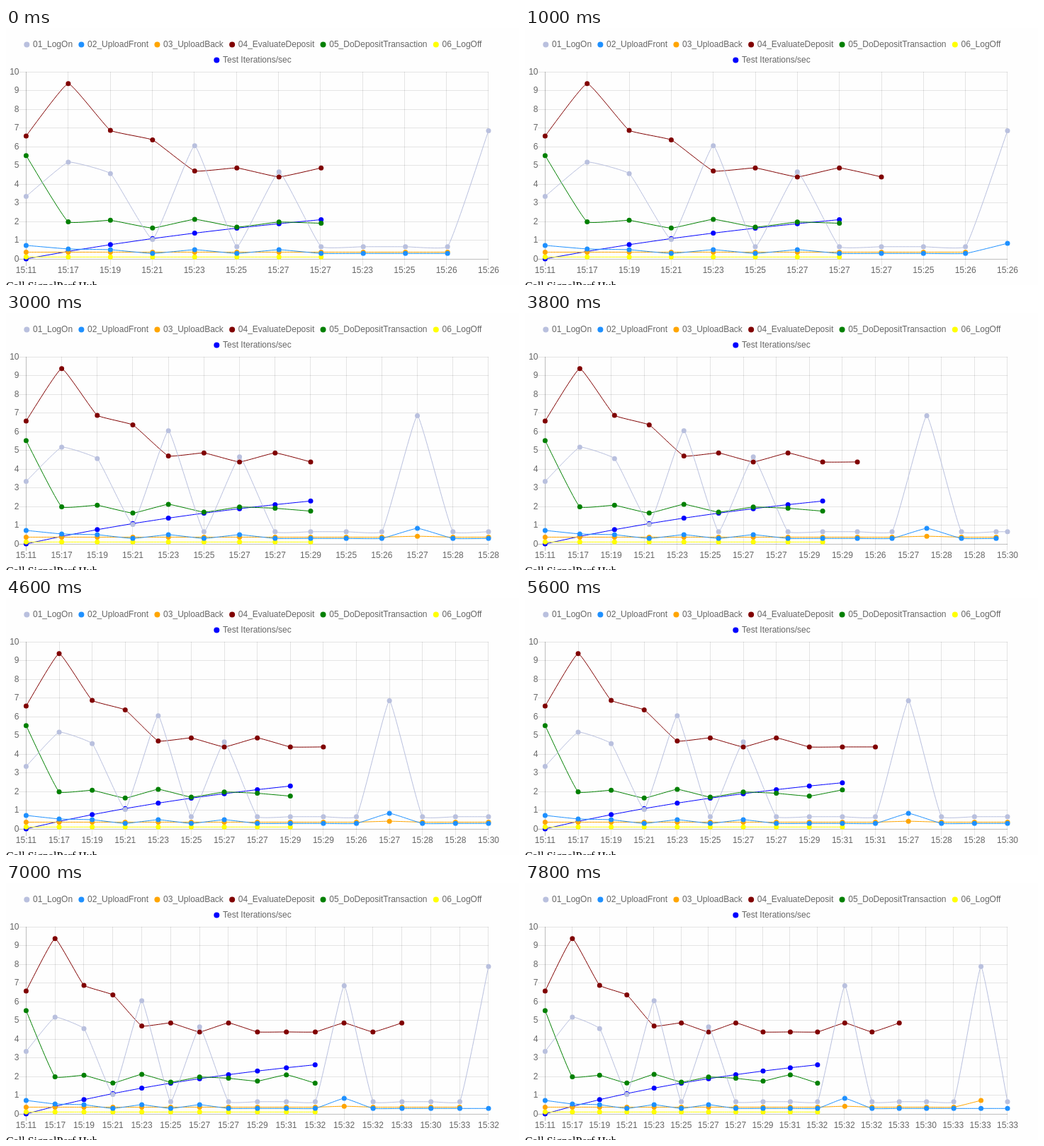
Recreate the animation shown at these times as an HTML page with a canvas. Size 724 px wide and 364 px high, loop 8000 ms.

```html
<!DOCTYPE html>
<html lang="en">
<head>
<meta charset="utf-8">
<title>Transaction timings</title>
<style>
  html, body { margin: 0; width: 100%; height: 100%; overflow: hidden; background: #fefefe; }
  canvas { display: block; }
</style>
</head>
<body>
<canvas id="stage" width="724" height="364"></canvas>
<script>
const ctx = document.getElementById('stage').getContext('2d');
const LOOP = 8000, STEP = 200, EASE_MS = 1000;
const LEFT = 28.4, RIGHT = 680.98, TOP = 62, BOTTOM = 327;
const TENSION = .1;
const FONT = '12px "Liberation Sans", Arial, sans-serif';

// Logons arrive first; both uploads follow each one after a fixed lag
const logons = [-600, 1446, 1470, 3700, 5900, 6290, 7200];
const follow = (lag, earliest) => logons.map(t => Math.max(earliest, t + lag));
const finished = [0, 1, 2].map(n => 2800 + 1900 * n);

// Key values by position, with a rule for all the others
const keyed = (keys, rule) => i => keys[i] ?? rule(i);
const beat = i => (i % 2 ? -1 : 1) * Math.cos((i - 3.5) * Math.PI / 6.6);

// "shown" values were there long before; the others come at "times"
const series = [
  { name: '01_LogOn', color: '#b9c0de', shown: 11, times: logons,
    value: keyed({ 0: 3.34, 1: 5.17, 2: 4.56, 3: 1.04, 4: 6.05, 6: 4.65, 11: 6.85, 16: 7.88 }, () => .65) },
  { name: '02_UploadFront', color: '#1e90ff', shown: 11, times: follow(320, 400),
    value: keyed({ 0: .72, 1: .53, 11: .83 }, i => i < 8 && i % 2 === 0 ? .49 : .29) },
  { name: '03_UploadBack', color: '#ffa500', shown: 11, times: follow(900, 1480),
    value: keyed({ 11: .41, 16: .72 }, () => .36) },
  { name: '04_EvaluateDeposit', color: '#800000', shown: 8, times: [1000, 3400, 5400, 6400, 6600, 6800],
    value: keyed([6.57, 9.37, 6.87, 6.36, 4.7], i => i % 2 && i % 3 ? 4.86 : 4.38) },
  { name: '05_DoDepositTransaction', color: '#008000', shown: 8, times: finished,
    value: keyed([5.52, 1.98], i => 1.88 + .24 * beat(i)) },
  { name: '06_LogOff', color: '#ffff00', shown: 8, times: finished,
    value: () => .1 },
  { name: 'Test Iterations/sec', color: '#0000ff', shown: 8, times: finished,
    value: i => 4.08 * (1 - Math.exp(-.103 * i)) }
];

const easeOut = p => 1 - Math.pow(1 - Math.min(1, Math.max(0, p)), 4);
const slotX = (i, count) => LEFT + i * (RIGHT - LEFT) / (count - 1);
const valueY = v => BOTTOM - v * (BOTTOM - TOP) / 10;
const clampY = y => Math.min(BOTTOM, Math.max(TOP, y));

const clockMinute = t => Math.floor(28 + (t - 1500) / 1055);
function openingMinute(i) {
  if (i === 0) return 11;
  return i < 8 ? Math.min(27, 15 + 2 * i) : Math.min(26, 7 + 2 * i);
}

function stateAt(time) {
  const births = series.map(s =>
    [...Array(s.shown).fill(-Infinity), ...s.times.filter(t => t <= time)]);
  const resizes = [{ at: -Infinity, count: series[0].shown }];
  for (const at of logons) {
    if (at <= time) resizes.push({ at, count: series[0].shown + resizes.length });
  }
  // The latest value in a slot writes its label
  const minutes = births[0].map((_, i) => {
    const latest = Math.max(...births.map(b => b[i] ?? -Infinity));
    return latest === -Infinity ? openingMinute(i) : clockMinute(latest);
  });
  return { minutes, births, resizes };
}

// A new point appears in place; older ones glide after each resize
function pointX(slot, birth, resizes, time) {
  let from, to, start;
  for (const { at, count } of resizes) {
    const target = slotX(slot, count);
    if (at <= birth) {
      from = target;
    } else {
      from += (to - from) * easeOut((at - start) / EASE_MS);
    }
    to = target;
    start = at;
  }
  return from + (to - from) * easeOut((time - start) / EASE_MS);
}

function rule(x1, y1, x2, y2, strong) {
  ctx.strokeStyle = strong ? 'rgba(0,0,0,0.25)' : 'rgba(0,0,0,0.1)';
  ctx.lineWidth = 1;
  ctx.beginPath();
  ctx.moveTo(x1, y1);
  ctx.lineTo(x2, y2);
  ctx.stroke();
}

function dot(x, y, r, color) {
  ctx.fillStyle = color;
  ctx.beginPath();
  ctx.arc(x, y, r, 0, Math.PI * 2);
  ctx.fill();
}

function label(text, x, y, align) {
  ctx.font = FONT;
  ctx.fillStyle = '#666';
  ctx.textAlign = align;
  ctx.textBaseline = 'alphabetic';
  ctx.fillText(text, x, y);
}

function drawLegend() {
  ctx.font = FONT;
  let x = 38;
  series.forEach((s, i) => {
    const last = i === series.length - 1;
    const tx = last ? 306 : x, y = last ? 45 : 23;
    dot(tx - 8.7, y + .4, 4, s.color);
    label(s.name, tx, y + 4, 'left');
    x += ctx.measureText(s.name).width + 21;
  });
}

function drawAxes(minutes) {
  for (let v = 0; v <= 10; v++) {
    const y = Math.floor(valueY(v));
    rule(18, y + .5, RIGHT, y + .5, v === 0);
    label(v, 18.5, y + 4, 'right');
  }
  minutes.forEach((m, i) => {
    const x = slotX(i, minutes.length);
    const gx = Math.floor(x) + .5;
    rule(gx, TOP, gx, BOTTOM + 10, i === 0);
    label('15:' + m, x, 347, 'center');
  });
}

function handles(prev, cur, next) {
  const a = Math.hypot(cur.x - prev.x, cur.y - prev.y);
  const b = Math.hypot(next.x - cur.x, next.y - cur.y);
  const dx = TENSION * (next.x - prev.x) / (a + b);
  const dy = TENSION * (next.y - prev.y) / (a + b);
  return {
    inX: cur.x - a * dx, inY: clampY(cur.y - a * dy),
    outX: cur.x + b * dx, outY: clampY(cur.y + b * dy)
  };
}

function drawSeries(s, births, resizes, time) {
  const pts = births.map((birth, i) => ({
    x: pointX(i, birth, resizes, time),
    y: valueY(s.value(i))
  }));
  const cps = pts.map((p, i) => handles(pts[i - 1] || p, p, pts[i + 1] || p));
  ctx.strokeStyle = s.color;
  ctx.lineWidth = 1;
  ctx.beginPath();
  ctx.moveTo(pts[0].x, pts[0].y);
  for (let i = 1; i < pts.length; i++) {
    const a = cps[i - 1], b = cps[i];
    ctx.bezierCurveTo(a.outX, a.outY, b.inX, b.inY, pts[i].x, pts[i].y);
  }
  ctx.stroke();
  for (const p of pts) dot(p.x, p.y, 3.5, s.color);
}

function draw(time) {
  const { minutes, births, resizes } = stateAt(time);
  ctx.fillStyle = '#fefefe';
  ctx.fillRect(0, 0, 724, 364);
  drawLegend();
  drawAxes(minutes);
  for (let i = series.length - 1; i >= 0; i--) {
    drawSeries(series[i], births[i], resizes, time);
  }
  ctx.font = '16px "Liberation Serif", Times, serif';
  ctx.fillStyle = '#000';
  ctx.textAlign = 'left';
  ctx.fillText('Call SignalPerf Hub', 0, 371);
}

const begin = performance.now();
function tick() {
  const time = (performance.now() - begin) % LOOP;
  draw(Math.floor(time / STEP) * STEP);
  requestAnimationFrame(tick);
}
tick();
</script>
</body>
</html>
```
